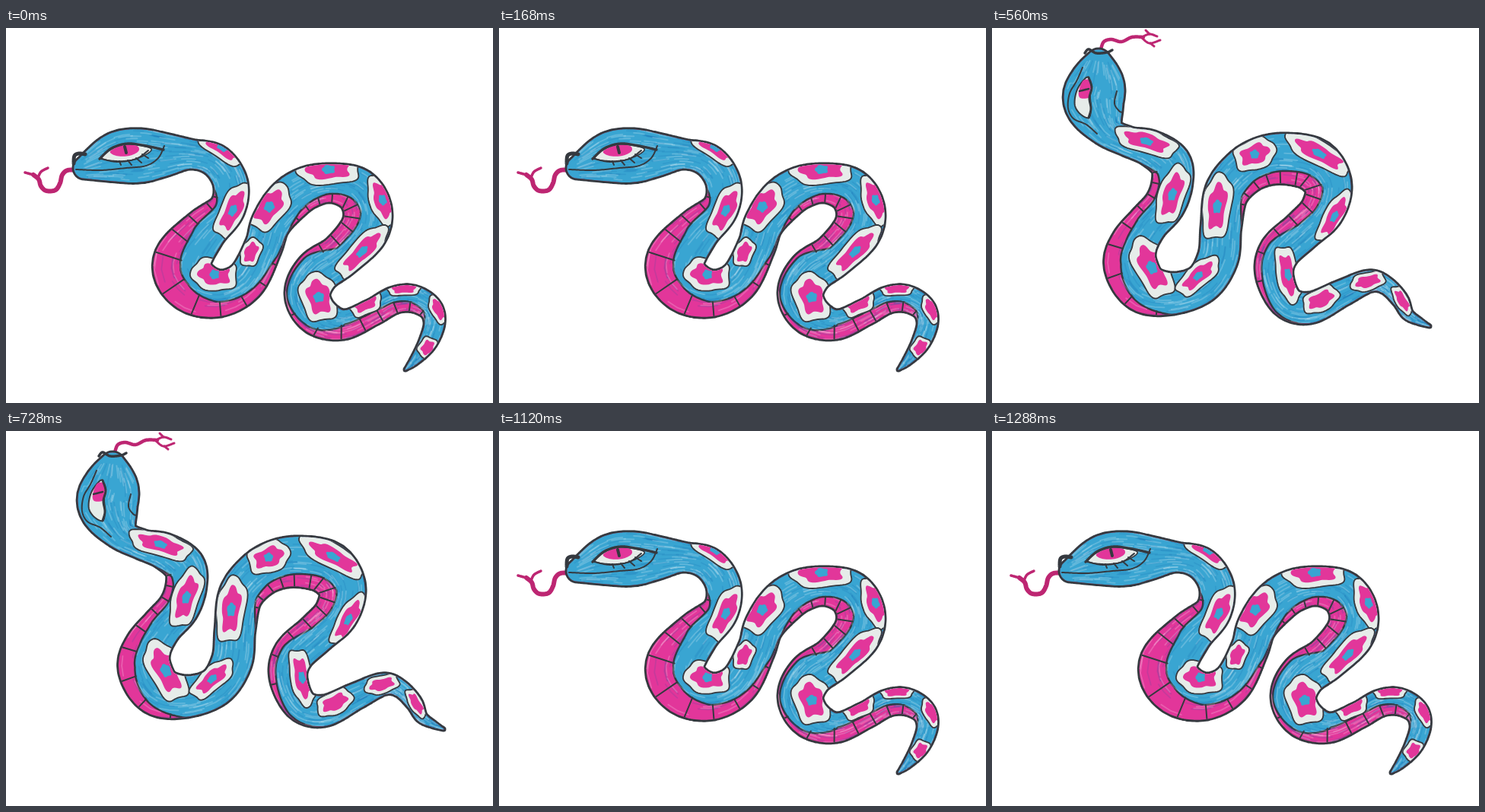
An HTML page with a canvas for the animation above (1400 ms loop, 640 px wide and 493 px high).

```html
<!DOCTYPE html>
<html lang="en">
<head>
<meta charset="utf-8">
<title>Snake</title>
<style>
html, body { margin: 0; width: 100%; height: 100%; overflow: hidden; background: #fff; }
canvas { display: block; }
</style>
</head>
<body>
<canvas id="stage" width="640" height="493"></canvas>
<script>
const g = document.getElementById('stage').getContext('2d');
const BLUE = '#39a5d2', PINK = '#e2369a', TONGUE = '#bd2672', WHITE = '#e6ece9', INK = '#35393f';
const STEP = 280, FINE = 16, TAU = Math.PI * 2;
g.lineCap = g.lineJoin = 'round';

const parse = text => text.split(' ').map(q => q.split(',').map(Number));

// Catmull-Rom samples through points of any dimension.
function smooth(pts, closed) {
  const n = pts.length, out = [];
  const at = i => closed ? pts[(i + n) % n] : pts[Math.max(0, Math.min(n - 1, i))];
  for (let i = 0; i < (closed ? n : n - 1); i++)
    for (let k = 0; k < FINE; k++) {
      const t = k / FINE;
      out.push(at(i).map((b, j) => {
        const a = at(i - 1)[j], c = at(i + 1)[j], d = at(i + 2)[j];
        return b + t / 2 * (c - a + t * (2 * a - 5 * b + 4 * c - d + t * (3 * (b - c) + d - a)));
      }));
    }
  if (!closed) out.push(pts[n - 1]);
  return out;
}

function trace(pts) {
  g.beginPath();
  pts.forEach(p => g.lineTo(p[0], p[1]));
}

function stroke(width, color = INK) {
  g.lineWidth = width;
  g.strokeStyle = color;
  g.stroke();
}

function line(text, width = 2, color) {
  for (const part of text.split('|')) {
    trace(smooth(parse(part)));
    stroke(width, color);
  }
}

function shape(text, fill, width) {
  trace(smooth(parse(text), true));
  g.closePath();
  g.fillStyle = fill;
  g.fill();
  if (width) stroke(width);
}

// Belly width by spine index, from [index, width] pairs.
function widthAt(keys, t) {
  const i = keys.findIndex(k => k[0] > t);
  if (i < 1) return 0;
  const [a, b] = [keys[i - 1], keys[i]];
  return a[1] + (b[1] - a[1]) * (t - a[0]) / (b[0] - a[0]);
}

function makeSpine(text, keys) {
  const s = smooth(parse(text));
  return s.map(([x, y, r], i) => {
    const a = s[Math.max(0, i - 1)], b = s[Math.min(s.length - 1, i + 1)];
    const angle = Math.atan2(b[1] - a[1], b[0] - a[0]);
    return { x, y, r, angle, nx: -Math.sin(angle), ny: Math.cos(angle), belly: widthAt(keys, i / FINE) };
  });
}

// Union of discs along the spine; back discs leave the belly uncovered.
function discs(spine, grow, back) {
  g.beginPath();
  for (const s of spine) {
    const d = back ? s.belly / 2 : 0, x = s.x - s.nx * d, y = s.y - s.ny * d;
    const r = Math.max(.5, s.r - d + grow);
    g.moveTo(x + r, y);
    g.arc(x, y, r, 0, TAU);
  }
}

function fillDiscs(spine, grow, back, color) {
  discs(spine, grow, back);
  g.fillStyle = color;
  g.fill();
}

const side = (s, off) => [s.x + s.nx * off, s.y + s.ny * off];

function ribs(spine) {
  let run = 0;
  spine.forEach((s, i) => {
    const p = spine[Math.max(0, i - 1)];
    run += Math.hypot(s.x - p.x, s.y - p.y);
    if (run < 24 || s.belly < 6) return;
    run = 0;
    trace([side(s, s.r), side(s, s.r - s.belly)]);
    stroke(2);
  });
}

// Marker strokes that follow the body.
function hatch(spine) {
  let seed = 7;
  const rnd = () => (seed = seed * 16807 % 2147483647) / 2147483647;
  for (let i = 0; i < 900; i++) {
    const k = Math.floor(rnd() * (spine.length - 9)), u = rnd() * 2 - 1;
    trace([0, 4, 8].map(j => side(spine[k + j], spine[k + j].r * u)));
    stroke(1.8, i % 2 ? 'rgba(255,255,255,.2)' : 'rgba(0,90,160,.13)');
  }
}

function blob(x, y, rx, ry, angle, wave, color) {
  g.beginPath();
  for (let i = 0; i < 60; i++) {
    const a = i / 60 * TAU, k = 1 + wave * Math.cos(5 * a + x), q = .8;
    const c = Math.cos(a), s = Math.sin(a);
    const u = Math.sign(c) * Math.abs(c) ** q * rx * k, v = Math.sign(s) * Math.abs(s) ** q * ry * k;
    g.lineTo(x + u * Math.cos(angle) - v * Math.sin(angle), y + u * Math.sin(angle) + v * Math.cos(angle));
  }
  g.closePath();
  g.fillStyle = color;
  g.fill();
}

function spot(spine, x, y, rx, ry) {
  const far = s => Math.hypot(s.x - x, s.y - y);
  const { angle } = spine.reduce((a, b) => far(b) < far(a) ? b : a);
  blob(x, y, rx, ry, angle, .07, WHITE);
  stroke(1.8);
  blob(x, y, rx * .68, ry * .6, angle, .13, PINK);
  if (rx * ry > 450) blob(x, y, rx * .2, ry * .28, angle, .1, BLUE);
}

function snake(points, keys, spots) {
  const spine = makeSpine(points, keys);
  fillDiscs(spine, 1.5, false, INK);
  g.save();
  discs(spine, -1.3, false);
  g.clip();
  fillDiscs(spine, 0, false, PINK);
  fillDiscs(spine, 1.2, true, INK);
  fillDiscs(spine, -1.2, true, BLUE);
  hatch(spine);
  ribs(spine);
  parse(spots).forEach(s => spot(spine, ...s));
  g.restore();
}

function low() {
  line('94,187 81,187 74,193 71,204 65,213 53,214 46,208 43,199 36,193', 6, TONGUE);
  line('25,190 36,193|42,197 46,189 55,184', 3.5, TONGUE);
  snake('103,184,15 145,170,33 175,168,36 203,167,30 243,166,20 276,175,22 295,204,23 290,238,24 ' +
    '259,268,30 231,308,38 245,338,37 280,349,31 315,332,27 338,288,25 348,257,26 370,228,29 ' +
    '396,210,28 428,204,26 460,213,30 475,238,32 470,267,32 440,299,29 409,321,30 396,350,30 ' +
    '410,378,27 443,390,20 481,374,18 510,358,18 535,356,18 557,368,16 563,388,14 554,414,12 538,436,7 525,449,2',
    parse('6,0 8,18 9,38 10,34 11,20 12,13 13,3 14,0 15,8 17,12 19,23 21,18 22,5 23,3 24,9 25,20 28,13 30,0'),
    '284,157,36,15 298,240,38,17 274,324,30,21 322,295,19,13 346,235,34,22 424,186,41,20 495,226,34,17 ' +
    '468,294,44,16 411,354,32,24 472,362,22,15 523,343,22,9 569,370,20,11 554,420,14,12');
  shape('126,171 139,159 161,153 191,159 174,171 150,175', WHITE, 1.6);
  shape('137,162 154,154 172,155 174,162 162,168 145,168', PINK);
  line('156,156 158,164', 4);
  line('123,172 139,158 160,152 184,155 207,160', 3.4);
  line('125,172 147,176 171,172 187,161|149,175 151,180|160,174 165,180|171,171 178,177|179,166 187,171');
  line('92,186 125,187 158,184 184,181 200,171 208,155');
  line('89,178 90,168 96,165 104,166', 5);
}

function middle() {
  line('122,107 117,99 117,88 111,79 101,74 92,77 85,84 89,94', 5, TONGUE);
  line('117,72 104,71 95,74 97,66 104,60', 3.6, TONGUE);
  snake('133,109,12 158,132,28 184,162,27 214,177,18 246,172,20 277,179,25 287,203,24 281,231,26 ' +
    '259,254,28 221,282,33 203,314,36 216,345,31 252,353,23 291,340,27 318,306,25 326,264,27 ' +
    '333,219,28 349,189,30 375,172,29 408,168,30 444,178,32 460,207,30 452,240,29 424,275,26 ' +
    '392,309,27 389,342,25 404,369,23 441,375,21 488,354,18 513,352,18 540,367,15 549,390,11 549,412,11 554,442,4',
    parse('2,0 3,4 5,9 7,8 8,14 9,20 10,18 11,8 12,0 14,0 15,7 16,7 17,16 19,22 21,16 23,14 25,13 26,2 27,0'),
    '268,160,32,11 289,226,34,15 314,243,38,15 224,320,35,20 284,324,33,14 362,163,24,22 436,160,39,17 ' +
    '463,243,40,17 404,318,37,18 440,370,26,14 495,346,19,11 536,366,20,13 550,416,17,8');
  line('311,189 306,210 300,250', 2.6);
  shape('155,117 166,122 175,130 180,143 187,156 173,151 161,142', WHITE, 2);
  shape('162,126 170,126 177,137 177,145 168,144 162,136', PINK, 1);
  line('162,136 174,134', 2.5);
  line('154,116 157,132 163,145 176,154 188,158', 3);
  line('158,139 152,138|163,146 157,148|171,152 168,159|178,155 181,163|195,147 210,159');
  line('129,110 137,131 146,151 160,168 181,179 198,176 208,164');
  line('123,104 128,97 138,97', 4);
}

function high() {
  line('143,28 147,18 157,15 170,18 184,12 199,12', 4.5, TONGUE);
  line('197,12 207,8 217,11|202,3 207,8|197,13 207,20 221,16|208,20 213,24', 3, TONGUE);
  snake('140,44,17 137,76,37 134,98,39 150,134,22 178,149,20 208,158,24 234,177,27 237,203,27 ' +
    '227,232,27 204,258,27 186,285,31 182,312,35 200,342,33 237,349,28 276,336,26 297,302,27 ' +
    '301,261,27 308,217,29 331,189,31 358,175,33 388,172,34 423,180,35 442,207,31 434,240,29 ' +
    '408,266,27 378,294,27 371,324,25 387,360,22 418,368,21 459,349,18 495,333,15 517,338,12 536,357,11 546,376,8 562,386,5 575,392,2',
    parse('5,0 7,10 9,13 10,20 11,23 12,14 13,0 16,0 17,8 18,13 20,18 22,23 24,18 25,10 26,9 27,3 28,0'),
    '203,149,42,16 237,219,40,18 296,235,43,19 210,315,42,22 271,326,34,15 345,166,28,20 430,165,48,16 ' +
    '450,248,38,14 389,324,38,15 432,357,25,15 494,333,23,12 539,358,21,9');
  shape('127,65 116,74 110,87 109,102 116,113 127,118 130,106 129,92', WHITE, 2);
  shape('120,69 130,69 130,79 128,91 116,92 114,83', PINK);
  line('115,83 127,80', 2.5);
  line('127,65 131,78 128,92 130,106 127,118', 3);
  line('119,52 111,70 102,86 100,105 107,119 124,127 138,139|164,83 161,99 167,109 172,111');
  line('122,33 127,28 137,33 151,32 158,29', 3.5);
}

const poses = [low, middle, high, middle, low];
let shown;

function tick() {
  const pose = poses[Math.floor(performance.now() / STEP) % poses.length];
  if (pose !== shown) {
    g.clearRect(0, 0, 640, 493);
    pose();
    shown = pose;
  }
  requestAnimationFrame(tick);
}
tick();
</script>
</body>
</html>
```
